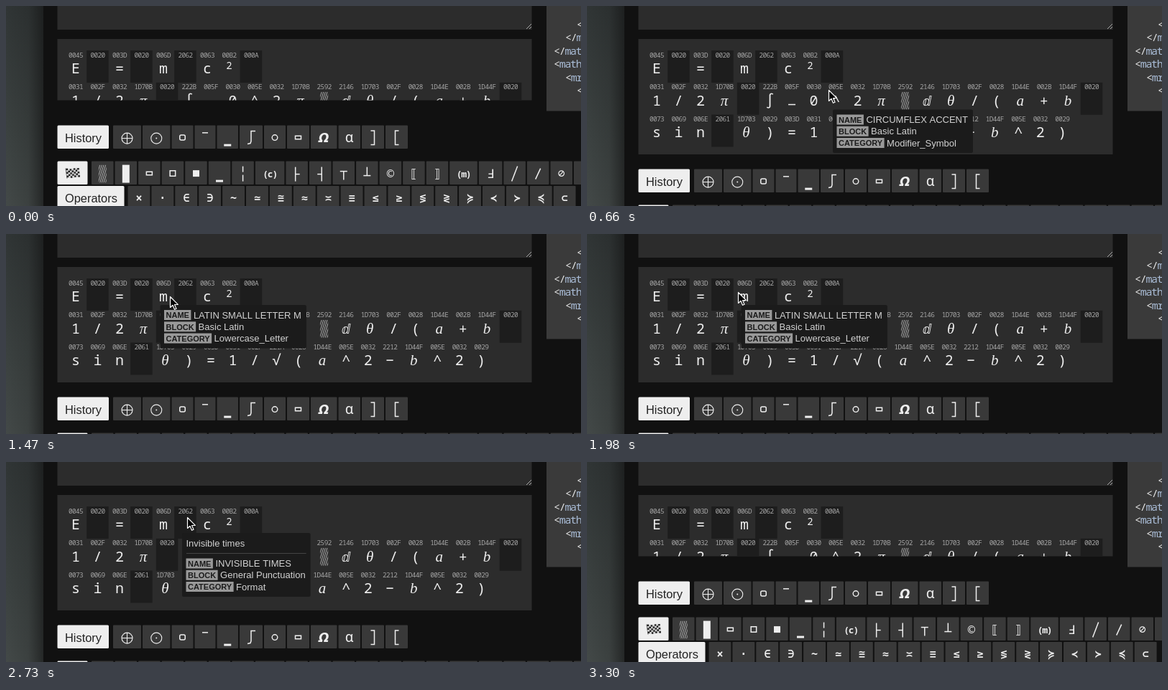
These frames come from a looping animation (800 px wide and 279 px high, 3.54 s). An HTML page with a canvas:

```html
<!DOCTYPE html>
<html lang="en">
<head>
<meta charset="utf-8">
<title>Character inspector</title>
<style>
html, body { margin: 0; width: 100%; height: 100%; overflow: hidden; background: #111; }
canvas { display: block; }
</style>
</head>
<body>
<canvas id="stage" width="800" height="279"></canvas>
<script>
const g = document.getElementById('stage').getContext('2d');
const LOOP = 3540;
const MONO = '"Noto Sans Mono", "DejaVu Sans Mono", monospace';
const SANS = '"Liberation Sans", Arial, sans-serif';
const MATH = '"DejaVu Sans", sans-serif';
const SYMBOL = '"DejaVu Sans Mono", "DejaVu Sans", monospace';
const SERIF = '"Liberation Serif", serif';
const INK = '#eee';

const rows = [
  ['0045 0020 003D 0020 006D 2062 0063 00B2 000A', 'E = m c² '],
  ['0031 002F 0032 1D70B 0020 222B 005F 0030 005E 0032 1D70B 2592 2146 1D703 002F 0028 1D44E 002B 1D44F 0020',
    '1/2π ∫_0^2π▒ⅆθ/(a+b '],
  ['0073 0069 006E 2061 1D703 0029 003D 0031 002F 221A 0028 1D44E 005E 0032 2212 1D44F 005E 0032 0029',
    'sin θ)=1/√(a^2−b^2)']
];

const tips = {
  caret: { x: 342, y: 144.5, info: ['CIRCUMFLEX ACCENT', 'Basic Latin', 'Modifier_Symbol'] },
  two: { x: 306, y: 99, info: ['SUPERSCRIPT TWO', 'Latin-1 Supplement', 'Other_Number'] },
  c: { x: 275.5, y: 99, info: ['LATIN SMALL LETTER C', 'Basic Latin', 'Lowercase_Letter'] },
  m: { x: 214.5, y: 99, info: ['LATIN SMALL LETTER M', 'Basic Latin', 'Lowercase_Letter'] },
  space: { x: 184, y: 99, info: ['SPACE', 'Basic Latin', 'Space_Separator'] },
  times: { x: 245, y: 99, title: 'Invisible times', info: ['INVISIBLE TIMES', 'General Punctuation', 'Format'] }
};
const hover = [[0], [540, 'caret'], [750], [810, 'two'], [1140, 'c'], [1260, 'times'], [1350, 'm'],
  [1560, 'space'], [1920, 'm'], [2130, 'times'], [3150]];

// time, x, y of the pointer tip
const path = [[0, 346, 300], [150, 346, 290], [330, 341, 131], [540, 338, 119], [660, 336, 117], [690, 336, 117],
  [810, 322, 104], [930, 312, 88], [1110, 312, 88], [1200, 287, 91], [1260, 264, 91], [1350, 235, 89],
  [1470, 228, 87], [1650, 183, 82], [1680, 183, 82], [1980, 210, 81], [2190, 243, 78], [2340, 252, 77],
  [3120, 252, 77], [3240, 252, -30], [3540, 252, -30]];

const clamp = v => Math.max(0, Math.min(1, v));
const ease = v => v * v * (3 - 2 * v);
const ramp = (t, a, b) => ease(clamp((t - a) / (b - a)));

function box(x, y, w, h, color, r = 0) {
  g.fillStyle = color;
  g.beginPath();
  g.roundRect(x, y, w, h, r);
  g.fill();
}

function text(s, x, y, font, color = INK, align = 'left', spacing = 0) {
  g.font = font;
  g.fillStyle = color;
  g.textAlign = align;
  g.letterSpacing = spacing + 'px';
  g.fillText(s, x, y);
  g.letterSpacing = '0px';
}

function line(points, width = 1.5, color = INK) {
  g.strokeStyle = color;
  g.lineWidth = width;
  g.beginPath();
  for (let i = 0; i < points.length; i += 2) g.lineTo(points[i], points[i + 1]);
  g.stroke();
}

function outline(w, h, r = 0) {
  g.strokeStyle = INK;
  g.lineWidth = 1.5;
  g.beginPath();
  g.roundRect(-w / 2, -h / 2, w, h, r);
  g.stroke();
}

function ring(r, width = 1.4) {
  g.strokeStyle = INK;
  g.lineWidth = width;
  g.beginPath();
  g.arc(0, 0, r, 0, 7);
  g.stroke();
}

function hatch() {
  g.beginPath();
  g.rect(-5.5, -12, 11, 25);
  g.clip();
  for (let x = -14; x < 9; x += 2.6) line([x, 13, x + 8, -12], .9, '#bbb');
}

// glyphs drawn around their own centre
const shapes = {
  '⊕': () => { g.translate(0, 1); ring(7.5, 1.1); line([-7.5, 0, 7.5, 0], 1.1); line([0, -7.5, 0, 7.5], 1.1); },
  '⊙': () => { g.translate(0, 1); ring(7.5, 1.1); box(-1, -1, 2, 2, INK, 1); },
  '▢': () => outline(7.5, 7, 2),
  '¯': () => box(-4, -7.5, 8, 1.5, INK),
  '▂': () => box(-5, 9, 10, 3, INK),
  '⌠': () => line([6, -9, 0, -9, 0, 5, -1, 8, -5, 9]),
  '○': () => ring(3.8),
  '▭': () => outline(8, 4.5),
  '□': () => outline(7.5, 7.5),
  '■': () => box(-4.5, -4.5, 9, 9, INK),
  '█': () => box(-5, -12, 10, 25, INK),
  '▒': hatch,
  '¦': () => { line([0, -10, 0, -2]); line([0, 2, 0, 11]); },
  '├': () => { line([-2, -9, -2, 11]); line([-2, 1, 4, 1]); },
  '┤': () => { line([2, -9, 2, 11]); line([-4, 1, 2, 1]); },
  '┬': () => { line([-5, -3, 5, -3]); line([0, -3, 0, 9]); },
  '┴': () => { line([-5, 3, 5, 3]); line([0, -9, 0, 3]); },
  '/': () => line([-4, 11, 4, -10]),
  '∕': () => line([-3.5, 8, 3.5, -7]),
  '⊘': () => { ring(3.8, 1.2); line([-2.7, 2.7, 2.7, -2.7], 1.2); },
  ']': () => line([-3, -9.5, 2, -9.5, 2, 10, -3, 10]),
  '[': () => line([3, -9.5, -2, -9.5, -2, 10, 3, 10]),
  'Ω': () => text('Ω', 0, 6, 'italic bold 17px ' + MATH, INK, 'center'),
  '(c)': () => text('(c)', 0, 5, 'bold 13px ' + MONO, INK, 'center', -1.2),
  '(m)': () => text('(m)', 0, 5, 'bold 13px ' + MONO, INK, 'center', -1.2)
};

function glyph(s, cx, cy, font, dy) {
  g.save();
  g.translate(cx, cy);
  if (shapes[s]) shapes[s]();
  else text(s, 0, dy, font, INK, 'center');
  g.restore();
}

function keys(list, edges, y, font, dy) {
  list.forEach((s, i) => {
    const x = edges[i], w = edges[i + 1] - x - 2;
    box(x, y, w, 32.5, '#393939', 1);
    glyph(s, x + w / 2, y + 17, font, dy);
  });
}

const label = (s, y, w) => {
  box(71.5, y, w, 32.5, '#eee', 1.5);
  if (s) text(s, 82, y + 23, '16.4px ' + SANS, '#222');
};

function flag(x, y) {
  line([x - 9, y - 6, x - 7, y + 8], 1, '#555');
  for (let i = 0; i < 7; i++) for (let j = 0; j < 5; j++) {
    const wave = Math.sin(i * .9) * .7;
    box(x - 8.5 + i * 2.6 + j * .3, y - 6 + j * 2.5 + wave, 2.6, 2.5, (i + j) % 2 ? '#ccc' : '#1c1c1c');
  }
}

const historyKeys = [...'⊕⊙▢¯▂⌠○▭Ωα]['];
const historyEdges = [149, 190, 230.5, 262.5, 293.5, 325, 359, 391, 424, 462.5, 495, 528, 561];
const shapeKeys = ['▒', '█', '▭', '□', '■', '▂', '¦', '(c)', '├', '┤', '┬', '┴', '©', '⟦', '⟧', '(m)', 'Ⅎ', '/', '∕', '⊘', ''];
const shapeEdges = shapeKeys.map((_, i) =>
  119 + i * 32.55 + (i > 7 ? 10 : 0) + (i > 15 ? 8 : 0) + (i > 16 ? 2 : 0));
shapeEdges.push(840);
const opKeys = [...'×·∈∋~≃≅≈≍≡≤≥≶≷≽≺≻≼⊂'];
const opEdges = [...opKeys, 0].map((_, i) => 169.5 + i * 32.9);

function keyboard(y) {
  label('History', y, 71.5);
  keys(historyKeys, historyEdges, y, '20px ' + MONO, 6.5);
  label('', y + 50, 42);
  flag(92, y + 66);
  keys(shapeKeys, shapeEdges, y + 50, '17px ' + SYMBOL, 6);
  label('Operators', y + 84.3, 93);
  keys(opKeys, opEdges, y + 84.3, 'bold 15px ' + SYMBOL, 5.5);
}

function backdrop() {
  box(0, 0, 800, 279, '#111');
  const down = g.createLinearGradient(0, 0, 0, 279);
  down.addColorStop(0, '#303535');
  down.addColorStop(.6, '#3b4140');
  down.addColorStop(1, '#434948');
  box(0, 0, 52, 279, down);
  const across = g.createLinearGradient(0, 0, 52, 0);
  across.addColorStop(0, 'rgba(17,17,17,0)');
  across.addColorStop(.6, 'rgba(17,17,17,.15)');
  across.addColorStop(1, 'rgba(17,17,17,.6)');
  box(0, 0, 52, 279, across);
}

function markup() {
  box(752, 0, 48, 146.5, '#3a3a3a');
  const font = '15px ' + MONO;
  [[795, 30.5, '<', 'mi'], [779, 49, '</', 'mrow'], [763, 67.5, '</', 'math'], [763, 86, '<', 'math'],
    [779, 104.5, '<', 'mrow'], [795, 123, '<', 'mi']].forEach(([x, y, open, tag]) => {
    text(open, x - 1, y, font, '#e4e4e4', 'left', -1.3);
    text(tag, x - 1 + open.length * 7.7, y, font, '#a9bcd6', 'left', -1.3);
  });
}

function cell(ch, cx, base) {
  if (ch === '▒') return glyph(ch, cx, base - 7);
  if (ch === '²') return text('2', cx, base - 6.5, '14px ' + MONO, INK, 'center');
  if (ch === '_') return box(cx - 5, base - 2, 10, 1.5, INK);
  if (ch === 'ⅆ') return text(ch, cx, base, '18px ' + MATH, INK, 'center');
  if ('πθab'.includes(ch)) return text(ch, cx, base, 'italic 21px ' + SERIF, INK, 'center');
  text(ch, cx, base, '20px ' + MONO, INK, 'center');
}

function inspector(h) {
  g.save();
  g.beginPath();
  g.rect(71.5, 46, 660, h);
  g.clip();
  box(71, 46, 661, 170, '#2c2c2c');
  rows.forEach(([codes, chars], r) => {
    const top = 62 + r * 44.7, glyphs = [...chars];
    let x = 81.7;
    codes.split(' ').forEach((code, i) => {
      const w = code.length > 4 ? 35.6 : 30.5, ch = glyphs[i], mid = x + w / 2;
      if (ch === ' ') box(x, top, w, 45, '#1d1d1d');
      else cell(ch, mid, top + 32);
      text(code, mid, top + 9.7, '9.4px ' + MONO, '#a5a5a5', 'center', -.6);
      x += w;
    });
  });
  g.restore();
}

function tooltip({ x, y, title, info }) {
  const names = ['NAME', 'BLOCK', 'CATEGORY'];
  const body = '13px ' + SANS, bold = 'bold 11px ' + SANS;
  const width = (s, font) => { g.font = font; return g.measureText(s).width; };
  const tags = names.map(s => width(s, bold) + 5);
  const w = Math.max(...info.map((s, i) => tags[i] + width(s, body))) + 16;
  const shift = title ? 28.5 : 0;
  box(x, y, w, 60.5 + shift, '#1b1b1b', 2);
  if (title) {
    text(title, x + 5.5, y + 18.5, body, '#d2d2d2');
    box(x + 6, y + 28, w - 12, 1, '#444');
  }
  info.forEach((s, i) => {
    const mid = y + 14 + shift + i * 16.3;
    box(x + 5.5, mid - 7, tags[i], 14, '#999');
    text(names[i], x + 8, mid + 4.2, bold, '#1b1b1b');
    text(s, x + 9 + tags[i], mid + 4.5, body, '#d2d2d2');
  });
}

function pointer(x, y) {
  g.save();
  g.translate(x, y);
  g.beginPath();
  [[.5, .5], [.5, 15.5], [4, 12.3], [6.5, 18.3], [9, 17.2], [6.5, 11.5], [11.3, 11.3]].forEach(p => g.lineTo(...p));
  g.closePath();
  g.fillStyle = '#000';
  g.strokeStyle = '#fff';
  g.lineWidth = 1.2;
  g.lineJoin = 'round';
  g.fill();
  g.stroke();
  g.restore();
}

function pointerAt(t) {
  const i = path.findIndex(p => p[0] > t);
  const [t0, x0, y0] = path[i - 1], [t1, x1, y1] = path[i];
  const k = (t - t0) / (t1 - t0);
  return [x0 + (x1 - x0) * k, y0 + (y1 - y0) * k];
}

function draw(t) {
  const open = ramp(t, 300, 510) - ramp(t, 3120, 3300);
  const h = 85.5 + 75.5 * open;
  backdrop();
  box(71.5, 0, 660, 33, '#2c2c2c');
  line([724, 32, 731, 25], 1, '#aaa');
  line([728, 32, 731, 29], 1, '#aaa');
  markup();
  inspector(h);
  keyboard(Math.max(146, 46 + h) + 20.6);
  const tip = hover.findLast(e => e[0] <= t)[1];
  if (tip) tooltip(tips[tip]);
  pointer(...pointerAt(t));
}

const start = performance.now();
function tick() {
  const t = (performance.now() - start) % LOOP;
  draw(Math.floor(t / 30) * 30);
  requestAnimationFrame(tick);
}
tick();
</script>
</body>
</html>
```
